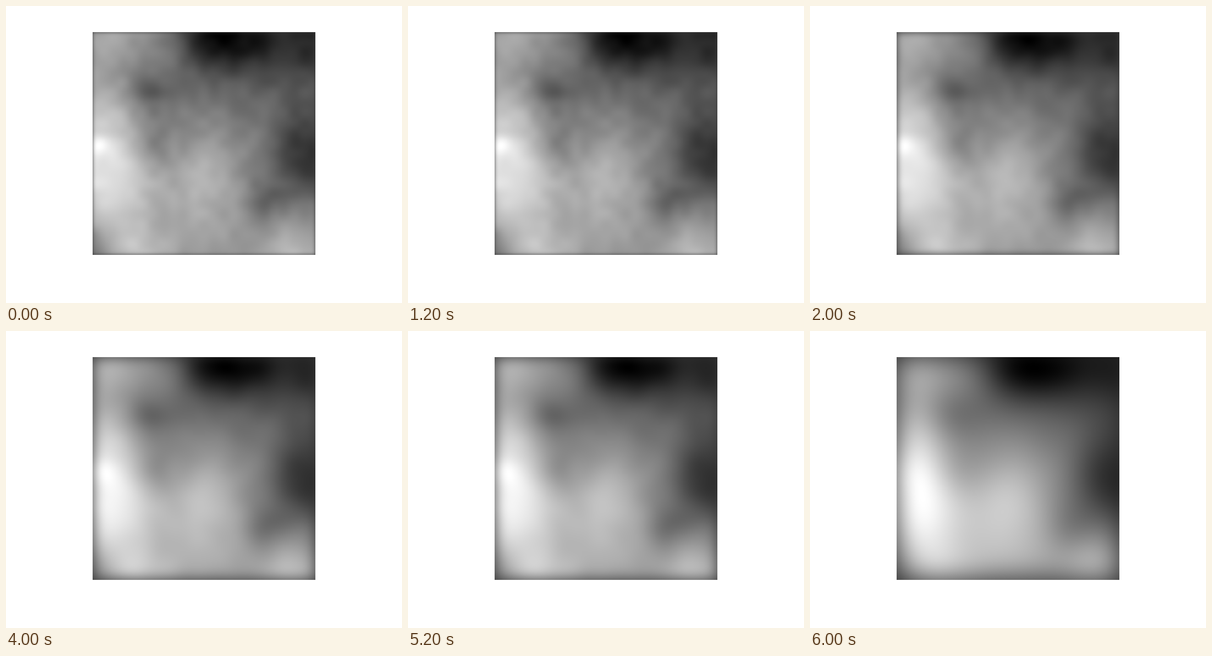
An HTML page with a canvas that plays this animation: 864x648 px, repeating every 8000 ms.

```html
<!DOCTYPE html>
<html lang="en">
<head>
<meta charset="utf-8">
<title>Gaussian smoothing of a noise field</title>
<style>
  html, body { margin: 0; width: 100%; height: 100%; overflow: hidden; background: #fff; }
  canvas { position: absolute; left: 189px; top: 57px; display: block; }
</style>
</head>
<body>
<canvas id="field" width="486" height="486"></canvas>
<script>
const SIZE = 486, HOLD = 2000;
const BASE = 130, PAD = 50;         // mean grey inside, grey beyond the edges
const GRAIN = 22, ROUGHNESS = 8;    // spacing and strength of the fine texture
const FIRST_SIGMA = 3.8, STEPS = 4; // sigma doubles at every step

// Key clouds: x, y, radius x, radius y, gain
const CLOUDS = [
  [25, 300, 75, 130, 90],    // bright left bank
  [10, 246, 16, 16, 40],     // its peak
  [20, 0, 50, 45, 25],       // upper left corner
  [248, 0, 52, 60, -96],     // black band along the top
  [345, 10, 60, 60, -92],
  [495, 15, 70, 60, -92],
  [320, 130, 170, 60, -22],  // haze below the band
  [480, 265, 70, 80, -90],   // dark right bank
  [375, 370, 30, 35, -40],   // its lower tongue
  [450, 490, 60, 65, 48],    // lower right corner
  [230, 400, 130, 130, 22],  // lower middle
  [245, 318, 35, 60, 25],
  [100, 480, 45, 35, 28],
  [0, 470, 30, 45, -55],     // lower left corner
  [125, 130, 35, 30, -45],   // hollows beside the left bank
  [130, 235, 35, 45, -42]
];

const profile = fn => Float64Array.from({ length: SIZE }, (_, i) => fn(i));
const bell = (d, s) => Math.exp(-d * d / (2 * s * s));

function seeded(seed) {
  return () => (seed = seed * 16807 % 2147483647) / 2147483647;
}

// Smooth noise: one separable term per row of random nodes.
function noiseTerms() {
  const random = seeded(41);
  const count = Math.ceil(SIZE / GRAIN) + 1;
  const hill = j => profile(i => bell(i - j * GRAIN, GRAIN / 2));
  const hills = Array.from({ length: count }, (_, j) => hill(j));
  return hills.map(py => {
    const gains = hills.map(() => (2 * random() - 1) * ROUGHNESS);
    return [profile(i => hills.reduce((sum, h, j) => sum + gains[j] * h[i], 0)), py];
  });
}

// The field is a sum of products of an x profile and a y profile.
const terms = [
  [profile(() => BASE - PAD), profile(() => 1)],
  ...CLOUDS.map(([x, y, rx, ry, gain]) =>
    [profile(i => gain * bell(i - x, rx)), profile(i => bell(i - y, ry))]),
  ...noiseTerms()
];

// One-dimensional Gaussian blur with nothing beyond the ends.
function blurrer(sigma) {
  const reach = Math.ceil(4 * sigma);
  const kernel = Array.from({ length: 2 * reach + 1 }, (_, k) => bell(k - reach, sigma));
  const total = kernel.reduce((a, b) => a + b);
  return line => profile(i => {
    const end = Math.min(SIZE - 1, i + reach);
    let sum = 0;
    for (let k = Math.max(0, i - reach); k <= end; k++) sum += line[k] * kernel[k - i + reach];
    return sum / total;
  });
}

function smooth(sigma) {
  const blur = blurrer(sigma);
  const values = new Float32Array(SIZE * SIZE);
  for (const [px, py] of terms.map(pair => pair.map(blur))) {
    for (let y = 0, i = 0; y < SIZE; y++) {
      for (let x = 0; x < SIZE; x++) values[i++] += px[x] * py[y];
    }
  }
  return toImage(values);
}

// Stretch the values to the full range from black to white.
function toImage(values) {
  const low = values.reduce((a, b) => Math.min(a, b));
  const high = values.reduce((a, b) => Math.max(a, b));
  const image = new ImageData(SIZE, SIZE);
  values.forEach((v, i) => {
    const grey = Math.round(255 * (v - low) / (high - low));
    image.data.fill(grey, i * 4, i * 4 + 3);
    image.data[i * 4 + 3] = 255;
  });
  return image;
}

const ctx = document.getElementById("field").getContext("2d");
const images = Array.from({ length: STEPS }, (_, n) => smooth(FIRST_SIGMA * 2 ** n));
const start = performance.now();
let shown = -1;

function draw() {
  const step = Math.floor((performance.now() - start) / HOLD) % STEPS;
  if (step !== shown) {
    ctx.putImageData(images[step], 0, 0);
    shown = step;
  }
  requestAnimationFrame(draw);
}
draw();
</script>
</body>
</html>
```
